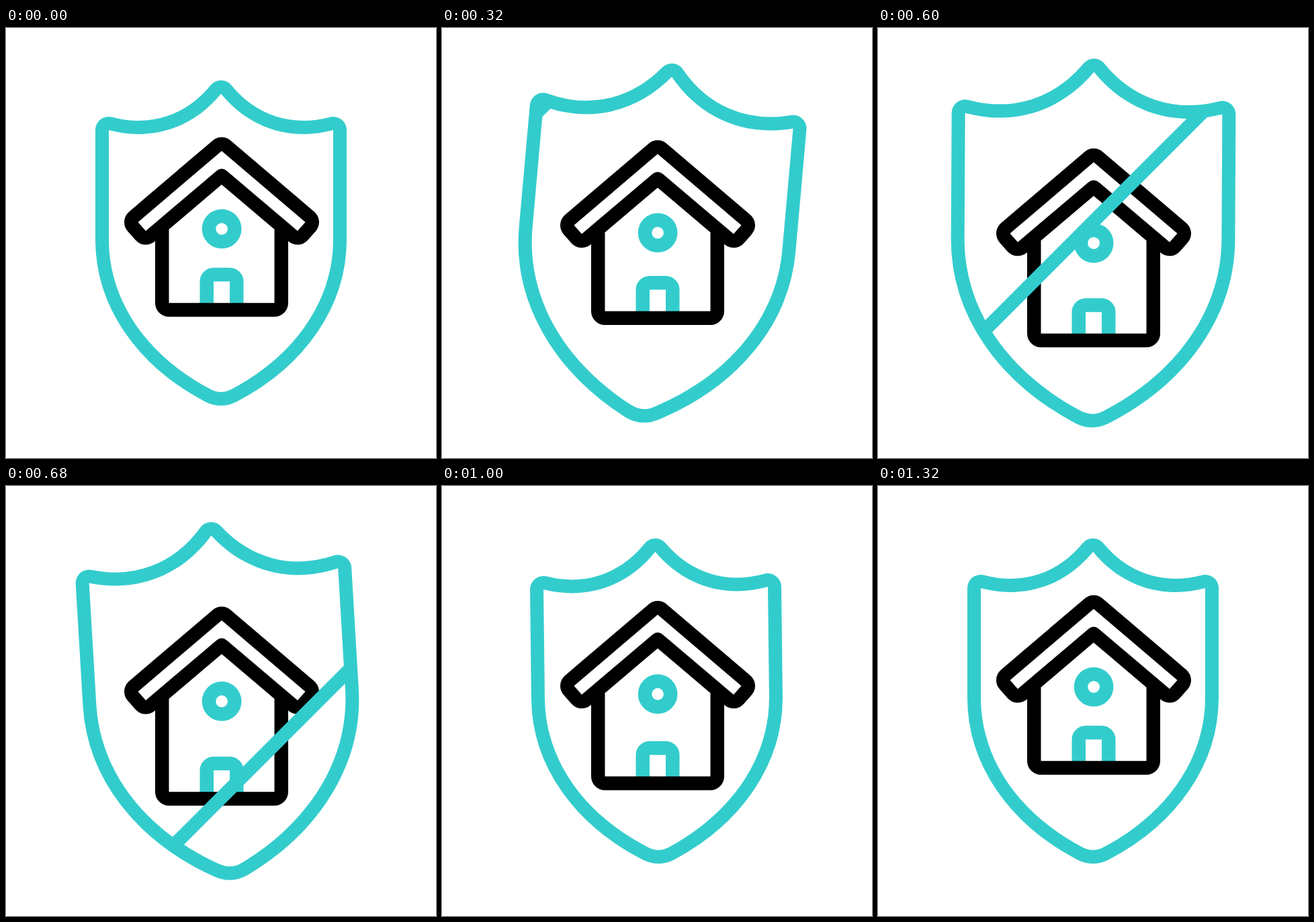
An HTML page that plays this animation: 640 px wide and 640 px high, repeating every 1440 ms.

```html
<!DOCTYPE html>
<html lang="en">
<head>
<meta charset="utf-8">
<title>Home shield</title>
<style>
  html, body { margin: 0; height: 100%; overflow: hidden; background: #fff; }
  svg { display: block; width: 100%; height: 100%; }
  .outlined { fill: #fff; stroke-linejoin: round; paint-order: stroke; }
  .teal { stroke: #33cccc; }
  .black { stroke: #000; }
  .line { fill: none; stroke-width: 20.5; }
</style>
</head>
<body>
<svg viewBox="0 0 640 640">
  <defs>
    <path id="plate" d="M153 152C217 169 278 149 320 98C362 149 423 169 487 152V315C487 405 431 488 334 538.5Q320 545.5 306 538.5C209 488 153 405 153 315Z"/>
    <clipPath id="inside"><use id="mask" href="#plate"/></clipPath>
  </defs>
  <use id="shield" href="#plate" class="outlined teal"/>
  <circle id="window" class="line teal" cx="321.1" cy="299" r="19.1"/>
  <path id="door" class="line teal" d="M298.75 412V377.25a10.25 10.25 0 0 1 10.25 -10.25H333a10.25 10.25 0 0 1 10.25 10.25V412"/>
  <path id="walls" class="line black"/>
  <path id="roof" class="outlined black" stroke-width="41" d="M196.5 289L321 183L445.5 289L434 302L329 213Q321 206.2 313 213L208 302Z"/>
  <g clip-path="url(#inside)">
    <path id="glint" class="teal" stroke-width="20" d="M-400 400L400 -400"/>
  </g>
</svg>
<script>
const LOOP = 1440, STEP = 40, MID = 320;
const $ = id => document.getElementById(id);
const shield = $('shield'), mask = $('mask'), glint = $('glint');
const win = $('window'), door = $('door'), walls = $('walls'), roof = $('roof');

const span = (t, a, b) => Math.min(1, Math.max(0, (t - a) / (b - a)));
const smooth = u => u * u * (3 - 2 * u);
const sineOut = u => Math.sin(u * Math.PI / 2);
const inOut = (u, k = 2.8) => u < 0.5 ? (2 * u) ** k / 2 : 1 - (2 - 2 * u) ** k / 2;

const shift = (el, y) => el.setAttribute('transform', `translate(0 ${y})`);
const pose = (angle, scale) =>
  `translate(${MID} ${MID}) rotate(${angle}) scale(${scale}) translate(${-MID} ${-MID})`;

function draw(t) {
  // Shield: swell, tilt right, tilt left, settle
  const scale = 1 + 0.155 * (sineOut(span(t, 50, 542)) - smooth(span(t, 542, 937)));
  const angle = 5.2 * smooth(span(t, 120, 340))
    - 8.9 * smooth(span(t, 480, 705))
    + 3.7 * smooth(span(t, 840, 1060));
  shield.setAttribute('transform', pose(angle, scale));
  shield.setAttribute('stroke-width', 40 / scale);
  // The mask reaches a little under the rim to avoid a seam
  mask.setAttribute('transform', pose(angle, scale * 1.02));

  // Diagonal glint sweeps from top left to bottom right
  const sweep = MID + 195.5 * (2 * inOut(span(t, 172, 1054)) - 1);
  glint.setAttribute('transform', `translate(${sweep} ${sweep})`);

  // House stretches down and back
  const drop = 46 * (inOut(span(t, 80, 680)) - inOut(span(t, 680, 1320)));
  const top = 0.37 * drop;
  shift(roof, top);
  shift(win, 0.465 * drop);
  shift(door, drop);
  walls.setAttribute('d', `M232.25 ${300 + top}V${409.25 + drop}
    a10.25 10.25 0 0 0 10.25 10.25H399.5a10.25 10.25 0 0 0 10.25 -10.25V${300 + top}`);
}

const start = performance.now();
function tick() {
  const t = (performance.now() - start) % LOOP;
  draw(Math.floor(t / STEP) * STEP);
  requestAnimationFrame(tick);
}
tick();
</script>
</body>
</html>
```
